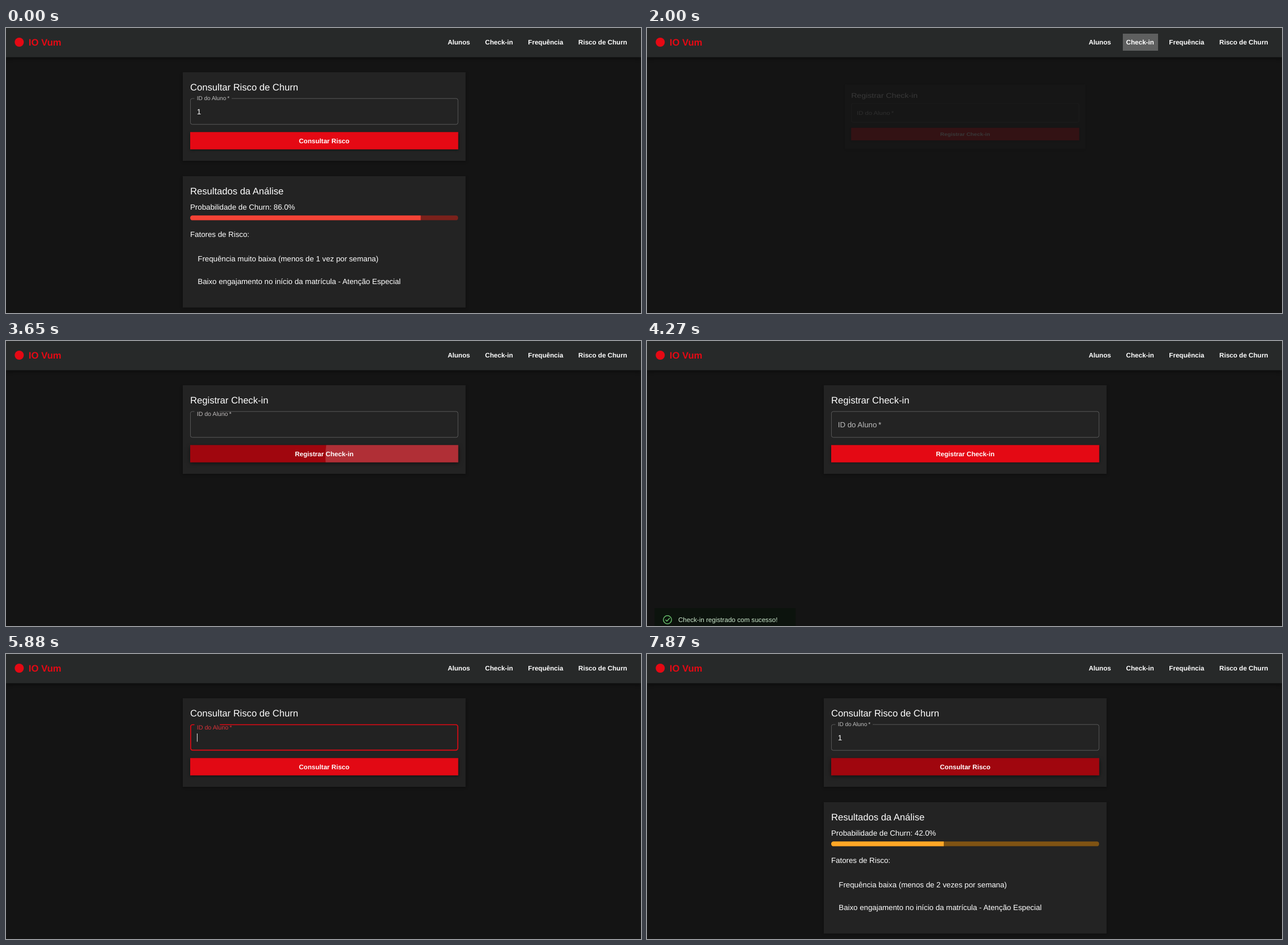
An HTML page with a canvas for the animation above (9070 ms loop, 1117x502 px).

```html
<!DOCTYPE html>
<html lang="pt-BR">
<head>
<meta charset="utf-8">
<title>Risco de Churn</title>
<style>
  html, body { margin: 0; width: 100%; height: 100%; overflow: hidden; background: #141414; }
  canvas { display: block; width: 1117px; height: 502px; }
</style>
</head>
<body>
<canvas id="stage" width="1117" height="502"></canvas>
<script>
const W = 1117, H = 502, LOOP = 9070, GROW = 800;
const FONT = '"Liberation Sans", Arial, sans-serif';
const RED = [229, 9, 20], DARK_RED = [160, 6, 14], WHITE = [255, 255, 255];
const BIG = 16.6, BODY = 13.28, SMALL = 11.6;
const ALWAYS = -1e4, NEVER = Infinity;

const stage = document.getElementById('stage').getContext('2d');
const layerCanvas = Object.assign(document.createElement('canvas'), { width: W, height: H });
const layer = layerCanvas.getContext('2d');
let ctx = stage;

const navItems = [
  { text: 'Alunos', x: 776.9 },
  { text: 'Check-in', x: 842.8, left: 837, width: 62, hover: [1290, 2250],
    press: { down: 1570, up: 1834, x: 868, y: 28 } },
  { text: 'Frequência', x: 918.3 },
  { text: 'Risco de Churn', x: 1006.8, left: 1001, width: 98.5, hover: [4430, 5500],
    press: { down: 5073, up: 5194, x: 1040.5, y: 33 } }
];

const riskPage = { title: 'Consultar Risco de Churn', button: 'Consultar Risco' };
const pages = [
  { ...riskPage, from: ALWAYS, typed: [ALWAYS, NEVER], focus: [NEVER, NEVER], hover: [NEVER, NEVER],
    result: { from: ALWAYS, percent: 86, main: '#f44336', track: '#7a211b',
      habit: 'Frequência muito baixa (menos de 1 vez por semana)' } },
  { from: 1834, title: 'Registrar Check-in', button: 'Registrar Check-in',
    focus: [2600, 3488], typed: [2890, 3640], hover: [3050, 4050],
    press: { down: 3488, up: 3590, x: 695, y: 203 }, toast: 3645 },
  { ...riskPage, from: 5194, focus: [5798, 6290], typed: [6080, NEVER], hover: [6130, NEVER],
    press: { down: 6290, up: 6390, x: 640, y: 201 },
    result: { from: 6474, percent: 42, main: '#ffa726', track: '#7f5313',
      habit: 'Frequência baixa (menos de 2 vezes por semana)' } }
];

// Cubic Bézier easing with control heights 0 and 1, solved by bisection.
function bezier(x1, y1, x2, y2) {
  const at = (a, b, s) => 3 * (1 - s) ** 2 * s * a + 3 * (1 - s) * s * s * b + s ** 3;
  return x => {
    if (x <= 0) return 0;
    if (x >= 1) return 1;
    let lo = 0, hi = 1;
    for (let i = 0; i < 22; i++) {
      const mid = (lo + hi) / 2;
      if (at(x1, x2, mid) < x) lo = mid; else hi = mid;
    }
    return at(y1, y2, lo);
  };
}
const easeInOut = bezier(0.4, 0, 0.2, 1);
const easeOut = bezier(0, 0, 0.2, 1);

const ramp = (t, start, length, ease = easeInOut) => ease((t - start) / length);
const hold = (t, [on, off], length, ease) => ramp(t, on, length, ease) - ramp(t, off, length, ease);
const within = (t, [on, off]) => t >= on && t < off;
const lerp = (a, b, p) => a + (b - a) * p;
const rgb = (a, b, p) => `rgb(${a.map((v, i) => Math.round(lerp(v, b[i], p)))})`;

function text(str, x, y, size, color = '#fff', weight = 'normal', align = 'left') {
  ctx.font = `${weight} ${size}px ${FONT}`;
  ctx.textAlign = align;
  ctx.fillStyle = color;
  ctx.fillText(str, x, y);
}

function box(x, y, w, h, color, shadow) {
  ctx.save();
  if (shadow) {
    ctx.shadowColor = `rgba(0,0,0,${shadow.alpha})`;
    ctx.shadowBlur = shadow.blur;
    ctx.shadowOffsetY = shadow.y;
  }
  ctx.fillStyle = color;
  ctx.fillRect(x, y, w, h);
  ctx.restore();
}

function ripple(t, press, x, y, w, h) {
  if (!press || t < press.down || t > press.up + 550) return;
  const grown = ramp(t, press.down, 550);
  const reach = Math.hypot(
    Math.max(press.x - x, x + w - press.x) + 1,
    Math.max(press.y - y, y + h - press.y) + 1);
  const alpha = (0.1 + 0.2 * grown) * (1 - ramp(t, press.up, 550));
  ctx.save();
  ctx.beginPath();
  ctx.rect(x, y, w, h);
  ctx.clip();
  ctx.beginPath();
  ctx.arc(press.x, press.y, reach * grown, 0, 7);
  ctx.fillStyle = `rgba(255,255,255,${alpha})`;
  ctx.fill();
  ctx.restore();
}

// Draws a group that fades in while it grows around its centre.
function grow(t, start, length, cx, cy, draw) {
  const alpha = ramp(t, start, length);
  if (alpha <= 0) return;
  const scale = lerp(0.75, 1, ramp(t, start, length * 0.666));
  const sy = scale * scale;
  layer.setTransform(1, 0, 0, 1, 0, 0);
  layer.clearRect(0, 0, W, H);
  layer.setTransform(scale, 0, 0, sy, cx * (1 - scale), cy * (1 - sy));
  ctx = layer;
  draw();
  ctx = stage;
  stage.globalAlpha = alpha;
  stage.drawImage(layerCanvas, 0, 0);
  stage.globalAlpha = 1;
}

const card = (y, h) => box(311, y, 497.5, h, '#232323', { alpha: 0.4, blur: 5, y: 1.5 });

function field(t, page) {
  const focused = within(t, page.focus);
  const filled = within(t, page.typed);
  const shrinkSpan = [Math.min(page.focus[0], page.typed[0]), page.typed[1]];
  const shrink = hold(t, shrinkSpan, 200, easeOut);
  const notch = 65.5 * hold(t, [shrinkSpan[0] + 50, shrinkSpan[1]], 100, easeOut);
  const line = focused ? 1.66 : 0.9;
  const left = 324 + line / 2, top = 123.7 + line / 2;

  ctx.save();
  ctx.beginPath();
  ctx.rect(320, 120, 480, 54);
  if (notch > 0.5) ctx.rect(331.5, 120, notch, 9);
  ctx.clip('evenodd');
  ctx.beginPath();
  ctx.roundRect(left, top, 471.5 - line, 46.5 - line, 3.3);
  ctx.lineWidth = line;
  ctx.strokeStyle = focused ? '#e50914' : 'rgba(255,255,255,0.27)';
  ctx.stroke();
  ctx.restore();

  const tint = hold(t, page.focus, 200, easeOut);
  text('ID do Aluno\u2009*', 335.7, lerp(151.8, 127.1, shrink), BODY * lerp(1, 0.75, shrink),
    rgb([189, 189, 189], RED, tint));
  if (filled) text('1', 335.7, 151.8, BODY);
  const lastInput = filled ? page.typed[0] : page.focus[0];
  if (focused && (t - lastInput) % 1000 < 500) {
    box(filled ? 343.2 : 335.9, 140, 0.9, 14.5, '#fff');
  }
}

function form(t, page) {
  const hover = hold(t, page.hover, 250);
  card(78, 156);
  text(page.title, 324, 110.2, BIG);
  field(t, page);
  box(324, 183.3, 471.5, 30.5, rgb(RED, DARK_RED, hover),
    { alpha: 0.55, blur: lerp(4, 7, hover), y: lerp(1.5, 2.5, hover) });
  ripple(t, page.press, 324, 183.3, 471.5, 30.5);
  text(page.button, 559.7, 202.6, SMALL, '#fff', 'bold', 'center');
}

function results({ percent, main, track, habit }) {
  card(261, 231.5);
  text('Resultados da Análise', 324, 292.9, BIG);
  text(`Probabilidade de Churn: ${percent.toFixed(1)}%`, 324, 320.2, BODY);
  ctx.save();
  ctx.beginPath();
  ctx.roundRect(324, 330.3, 471.5, 8.3, 4.15);
  ctx.clip();
  box(324, 330, 471.5, 9, track);
  box(324, 330, 4.715 * percent, 9, main);
  ctx.restore();
  text('Fatores de Risco:', 324, 367.6, BODY);
  text(habit, 337.3, 410.8, BODY);
  text('Baixo engajamento no início da matrícula - Atenção Especial', 337.3, 450.8, BODY);
}

function toast() {
  box(13.3, 470.5, 248, 40, 'rgb(12,19,13)');
  ctx.strokeStyle = '#66bb6a';
  ctx.lineWidth = 1.5;
  ctx.beginPath();
  ctx.arc(36, 491, 7.2, 0, 7);
  ctx.moveTo(32.5, 491);
  ctx.lineTo(35, 493.5);
  ctx.lineTo(40, 488);
  ctx.stroke();
  text('Check-in registrado com sucesso!', 55, 495, SMALL, '#cce8cd');
}

function header(t) {
  box(0, 0, W, 51.5, '#272929', { alpha: 0.45, blur: 7, y: 2 });
  ctx.beginPath();
  ctx.arc(23.3, 25, 8, 0, 7);
  ctx.fillStyle = '#e50914';
  ctx.fill();
  text('IO Vum', 39.8, 30.7, BIG, '#e50914', 'bold');
  for (const item of navItems) {
    if (item.hover) {
      const glow = hold(t, item.hover, 250);
      box(item.left, 10, item.width, 30, `rgba(255,255,255,${0.085 * glow})`);
      ripple(t, item.press, item.left, 10, item.width, 30);
    }
    text(item.text, item.x, 29.1, SMALL, '#fff', 'bold');
  }
}

function frame(now) {
  const t = now % LOOP;
  const page = pages.findLast(p => t >= p.from);
  box(0, 0, W, H, '#141414');
  grow(t, page.from, GROW, 559.75, 156, () => form(t, page));
  if (page.result) grow(t, page.result.from, GROW, 559.75, 376.75, () => results(page.result));
  if (page.toast) grow(t, page.toast, 225, 137, 490.5, toast);
  header(t);
  requestAnimationFrame(() => frame(performance.now() - begin));
}

for (const c of [stage, layer]) c.textRendering = 'geometricPrecision';
const begin = performance.now();
frame(0);
</script>
</body>
</html>
```
